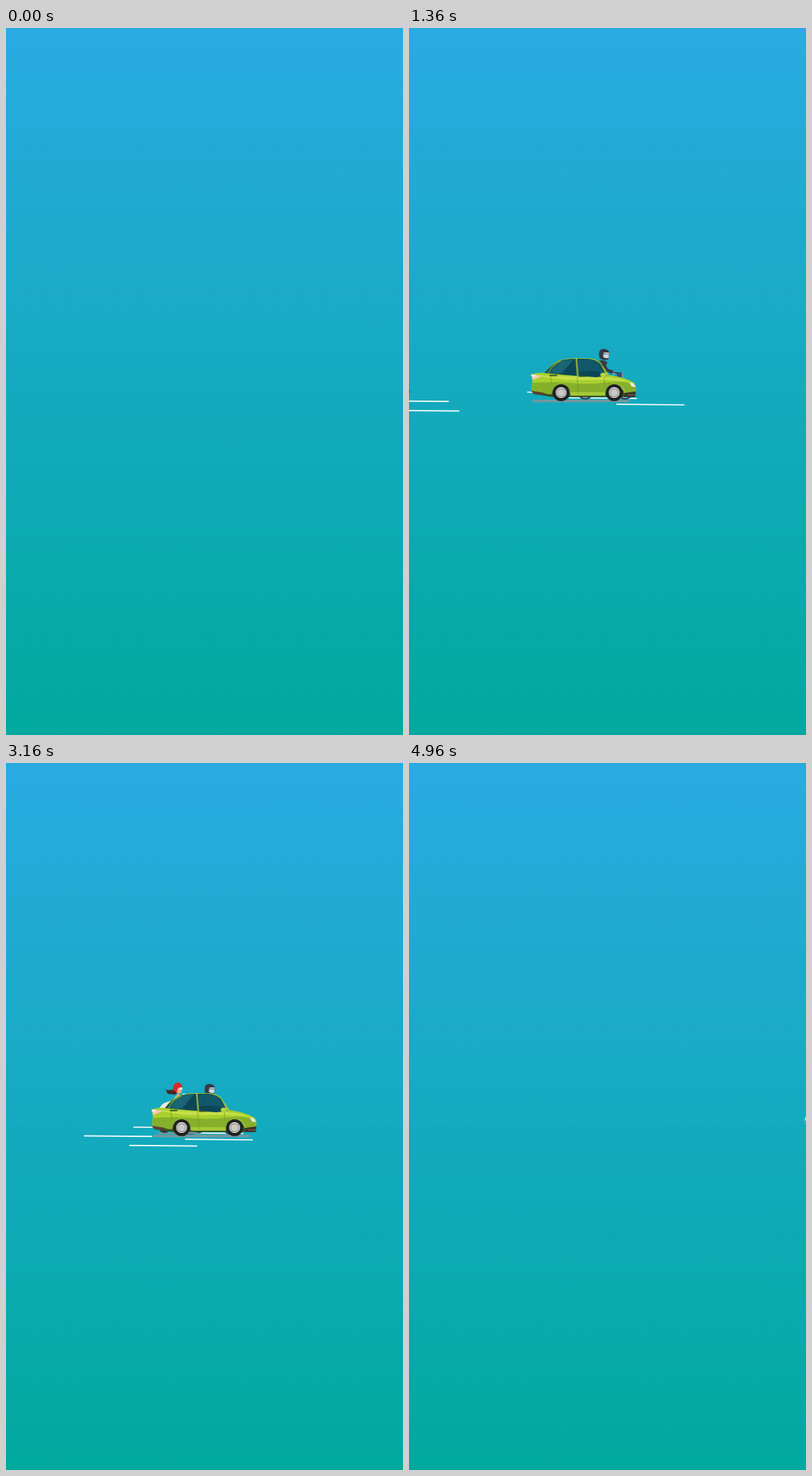
Recreate the animation shown at these times as an HTML page without scripts. Size 561 by 998 pixels, loop 5 s.

```html
<!DOCTYPE html>
<html lang="en">
<head>
<meta charset="utf-8">
<title>Road trip</title>
<style>
  html, body { margin: 0; width: 100%; height: 100%; overflow: hidden; }
  body { background: linear-gradient(#29abe2, #00a99d); }
  svg { display: block; width: 561px; height: 998px; }

  .move { animation: 5s infinite cubic-bezier(.37, 0, .63, 1); }
  #bike { animation-name: bike; }
  #car { animation-name: car; }
  #scooter { animation-name: scooter; }
  #pair { animation-name: pair; }
  #dash1 { animation-name: dash1; }
  #dash2 { animation-name: dash2; }
  #dash3 { animation-name: dash3; }

  /* Vehicles glide in, drift, then accelerate away. */
  @keyframes bike {
    0% { transform: translateX(-90px); }
    20% { transform: translateX(230px); animation-timing-function: ease-out; }
    35.2% { transform: translateX(241px); animation-timing-function: linear; }
    50.4% { transform: translateX(246px); animation-timing-function: linear; }
    65.1% { transform: translateX(250px); animation-timing-function: cubic-bezier(.11, 0, .5, 0); }
    80%, 100% { transform: translateX(712px); }
  }
  @keyframes car {
    0%, 10.3% { transform: translateX(-160px); }
    30% { transform: translateX(188px); animation-timing-function: linear; }
    35.2% { transform: translateX(190px); animation-timing-function: linear; }
    50.4% { transform: translateX(198px); animation-timing-function: linear; }
    77.5% { transform: translateX(212px); animation-timing-function: cubic-bezier(.11, 0, .5, 0); }
    92.4%, 100% { transform: translateX(674px); }
  }
  @keyframes scooter {
    0%, 24% { transform: translateX(-89px); }
    44% { transform: translateX(205px); animation-timing-function: linear; }
    50.4% { transform: translateX(206px); animation-timing-function: linear; }
    74.4% { transform: translateX(213.5px); animation-timing-function: linear; }
    86.4% { transform: translateX(215px); animation-timing-function: cubic-bezier(.11, 0, .5, 0); }
    100% { transform: translateX(601px); }
  }

  /* Speed lines sway while the vehicles cruise. */
  @keyframes pair {
    0%, 11% { transform: translateX(-100px); }
    20% { transform: translateX(218px); }
    35.2% { transform: translateX(235px); }
    50.4% { transform: translateX(265px); }
    74.4% { transform: translateX(218px); }
    86.4% { transform: translateX(251px); animation-timing-function: ease-in; }
    98%, 100% { transform: translateX(640px); }
  }
  @keyframes dash1 {
    0%, 23% { transform: translateX(-100px); }
    35.2% { transform: translateX(127px); }
    45% { transform: translateX(102px); }
    50.4% { transform: translateX(140px); }
    69% { transform: translateX(102px); }
    74.4% { transform: translateX(122px); }
    86.4% { transform: translateX(150px); animation-timing-function: ease-in; }
    98%, 100% { transform: translateX(580px); }
  }
  @keyframes dash2 {
    0%, 11% { transform: translateX(-100px); }
    20% { transform: translateX(300px); }
    35.2% { transform: translateX(285px); }
    50.4% { transform: translateX(193px); }
    74.4% { transform: translateX(301px); }
    86.4% { transform: translateX(310px); animation-timing-function: ease-in; }
    98%, 100% { transform: translateX(580px); }
  }
  @keyframes dash3 {
    0%, 23% { transform: translateX(-100px); }
    35.2% { transform: translateX(182px); }
    50.4% { transform: translateX(188px); }
    74.4% { transform: translateX(163px); }
    86.4% { transform: translateX(208px); animation-timing-function: ease-in; }
    98%, 100% { transform: translateX(580px); }
  }
</style>
</head>
<body>
<svg viewBox="0 0 561 998" fill="none" stroke-linecap="round" stroke-linejoin="round">
  <defs>
    <path id="dash" d="M0 0 96 .8" stroke="#fff" stroke-width="1.7" stroke-linecap="butt"/>
    <g id="carWheel">
      <circle r="12" fill="#20201f"/>
      <circle r="7.6" fill="#f1f0ea"/>
      <circle r="6.3" fill="#77777a"/>
      <circle r="5.3" fill="#c9c9c6"/>
    </g>
    <g id="bikeWheel">
      <circle r="10.6" fill="#82abd6" stroke="#293f60" stroke-width="2.2"/>
      <path d="M-8 0H8M0-8V8M-6-6 6 6M6-6-6 6" stroke="#a9c8e6" stroke-width=".7"/>
      <circle r="3" fill="#d9e7f3"/>
    </g>
    <g id="scooterWheel">
      <circle r="8.7" fill="#34383e"/>
      <circle r="5.6" fill="#dfe5e4"/>
      <circle r="3.6" fill="#929fa2"/>
    </g>
  </defs>

  <g id="pair" class="move">
    <use href="#dash" x="-59" y="514"/>
    <use href="#dash" y="522"/>
  </g>
  <g id="dash1" class="move"><use href="#dash" y="526.4"/></g>
  <g id="dash2" class="move"><use href="#dash" y="531.2"/></g>
  <g id="dash3" class="move"><use href="#dash" y="539.8"/></g>

  <g id="bike" class="move">
    <use href="#bikeWheel" x="11.8" y="513"/>
    <use href="#bikeWheel" x="68" y="513"/>
    <path d="M2 504Q11 496 21 505M57 504Q67 497 77 504" stroke="#3d70a5" stroke-width="2"/>
    <path d="M12 513 25 500 46 499 55 492" stroke="#315c8c" stroke-width="3"/>
    <path d="M57 488 68 513" stroke="#c4d9eb" stroke-width="2.4"/>
    <path d="M57 488 61 498" stroke="#395b80" stroke-width="2.6"/>
    <path d="M33 503 48 501 51 511 46 516H35Z" fill="#aebfcd"/>
    <circle cx="43" cy="508" r="4.5" fill="#dce6ed"/>
    <path d="M9 514.5H30L44 517" stroke="#eef4f6" stroke-width="3"/>
    <path d="M1 493Q10 490 26 492V497L3 497Z" fill="#27364c"/>
    <path d="M4 499H26" stroke="#477bac" stroke-width="3"/>
    <path d="M37 495Q46 488 56 493L54 499 39 501Z" fill="#5b91c2"/>
    <circle cx="51" cy="493" r="2.6" fill="#d5e5f0"/>
    <path d="M23 489 36 488 42 494 37 501 38 514H32L30 500 23 497Z" fill="#285b8b"/>
    <path d="M31 514H40V516.5H31Z" fill="#24303f"/>
    <path d="M31 470Q38 467 43 472L39 481 36 490H20Q22 477 31 470Z" fill="#3c3b45"/>
    <path d="M37 474 42 483 51 486" stroke="#3c3b45" stroke-width="5"/>
    <circle cx="52" cy="486.5" r="2" fill="#c9d2d8"/>
    <path d="M50 486 58 487" stroke="#1f2d40" stroke-width="1.5"/>
    <path d="M57 486H64L66 489 64 493H58Z" fill="#3c4b60"/>
    <path d="M64.5 487V492" stroke="#78a6cd" stroke-width="2"/>
    <path d="M32 466Q29 453 38 453 46 453 46 461L44 468Q37 470 32 466Z" fill="#373842"/>
    <path d="M38 458H45.5L45 465Q41 468 37 464Z" fill="#ccd8df"/>
    <path d="M38 459H45V461H38Z" fill="#8ca4b1"/>
  </g>

  <g id="scooter" class="move">
    <path d="M5 522.5H64" stroke="#8497a0" stroke-width="1.8"/>
    <use href="#scooterWheel" x="14" y="513.5"/>
    <use href="#scooterWheel" x="63" y="513.5"/>
    <path d="M5 497Q14 490 29 493 36 498 38 508L48 509 51 487Q49 479 52 477 57 477 57 487L60 501Q70 502 72 511L66 508Q58 507 54 515H29Q23 509 20 508 13 505 7 510L2 512Q0 504 5 497Z" fill="#70979a"/>
    <path d="M6 502Q14 496 25 500 31 504 28 510 20 503 8 507Z" fill="#86aaab"/>
    <path d="M51 482Q52 493 58 502" stroke="#91b1b0" stroke-width="1.2"/>
    <path d="M3 497 5 496 5 503 1 505Z" fill="#f1eee9"/>
    <path d="M2 497 5 495V499H2Z" fill="#df3a32"/>
    <path d="M7 492Q17 489 36 491L34 495Q20 496 7 494Z" fill="#51302b"/>
    <path d="M33 489 40 492 41 502" stroke="#e6a477" stroke-width="5"/>
    <path d="M38 500H44L43 511 46 514H38Z" fill="#85502f"/>
    <path d="M28 472Q33 468 37 472L35 482 39 490Q27 493 6 488 12 477 27 477Z" fill="#f3eadb"/>
    <path d="M28 481Q20 482 14 489M31 482Q27 485 25 490" stroke="#d8cebf" stroke-width=".8"/>
    <path d="M34 471 39 478 48 480" stroke="#e8a67a" stroke-width="2.8"/>
    <path d="M31 467H35V471H31Z" fill="#e8a67a"/>
    <path d="M31 459Q25 463 14 461 18 463 17 465 20 469 24 467 26 470 32 466Z" fill="#4a2824"/>
    <path d="M31 457H38L39 461 37 466Q32 468 30 463Z" fill="#efb18a"/>
    <path d="M26 462Q25 452 33 451 39 452 39 458L33 459 31 465Z" fill="#d9292a"/>
    <path d="M35 458H39V461H35Z" fill="#fff2e6"/>
    <path d="M48 480 53 476 54 468M50 478 42 470M48 469Q48 479 54 481" stroke="#b9d1d5" stroke-width="1.2"/>
    <ellipse cx="41.5" cy="469" rx="2.5" ry="2.8" fill="#d8e5e6"/>
    <circle cx="53" cy="469" r="2" fill="#9cdae8"/>
    <circle cx="54" cy="478" r="3" fill="#e7eae2"/>
  </g>

  <g id="car" class="move">
    <path d="M5 526.5H138" stroke="#78969c" stroke-width="3.4"/>
    <path d="M3 510 5 517 32 521H131L148 521 149 511Z" fill="#335326"/>
    <path d="M1 489Q10 486 20 487 28 475 39 470 49 466 65 466H78Q93 466 99 472L111 490Q135 493 147 501 150 506 149 514L136 517H133Q130 503 118 503 108 503 105 519H57Q54 503 43 503 33 503 30 517L4 514Q0 512 3 500Z" fill="#a9cf2e"/>
    <path d="M3 501Q30 499 55 501 82 504 112 500 134 498 148 504L149 514H134Q130 502 118 502 108 502 105 519H57Q54 502 43 502 33 502 30 517L4 514Q1 511 3 501Z" fill="#86b02c"/>
    <path d="M9 490Q45 492 109 493 126 494 143 500 119 496 80 497 35 498 9 490Z" fill="#c5df48"/>
    <path d="M56 514H106V519H57Z" fill="#a4c936"/>
    <path d="M20 487Q31 473 44 469 58 466 81 467 93 468 99 474L108 491 93 493 52 490Z" fill="#0d4656"/>
    <path d="M27 487Q34 474 46 469L61 468 44 488Z" fill="#196475"/>
    <path d="M68 468H83Q93 469 97 474L104 487Q84 482 68 485Z" fill="#125769"/>
    <path d="M65 467 67 491" stroke="#9ac431" stroke-width="2.2"/>
    <path d="M25 487Q32 474 43 470" stroke="#80a62d" stroke-width="1.4"/>
    <path d="M66 491 68 517M28 490 30 503M104 493 105 504" stroke="#6b912b" stroke-width=".7"/>
    <path d="M28 490.5H37M69 491.5H78" stroke="#36552a" stroke-width="1.8"/>
    <ellipse cx="103" cy="489.5" rx="4.2" ry="3" fill="#b6d740"/>
    <path d="M1 489 17 491 4 497Z" fill="#f3c9b8"/>
    <path d="M1 489 9 490 3 493Z" fill="#faf0e5"/>
    <path d="M140 500Q147 501 149 507L143 506Z" fill="#e9eee0"/>
    <path d="M1 512 20 515V518L4 516Z" fill="#5f4030"/>
    <path d="M133 515 149 513 148 521H133Z" fill="#39352c"/>
    <path d="M138 518H147" stroke="#835044" stroke-width="1.3"/>
    <use href="#carWheel" x="43.5" y="514.7"/>
    <use href="#carWheel" x="118.5" y="514.7"/>
  </g>
</svg>
</body>
</html>
```
